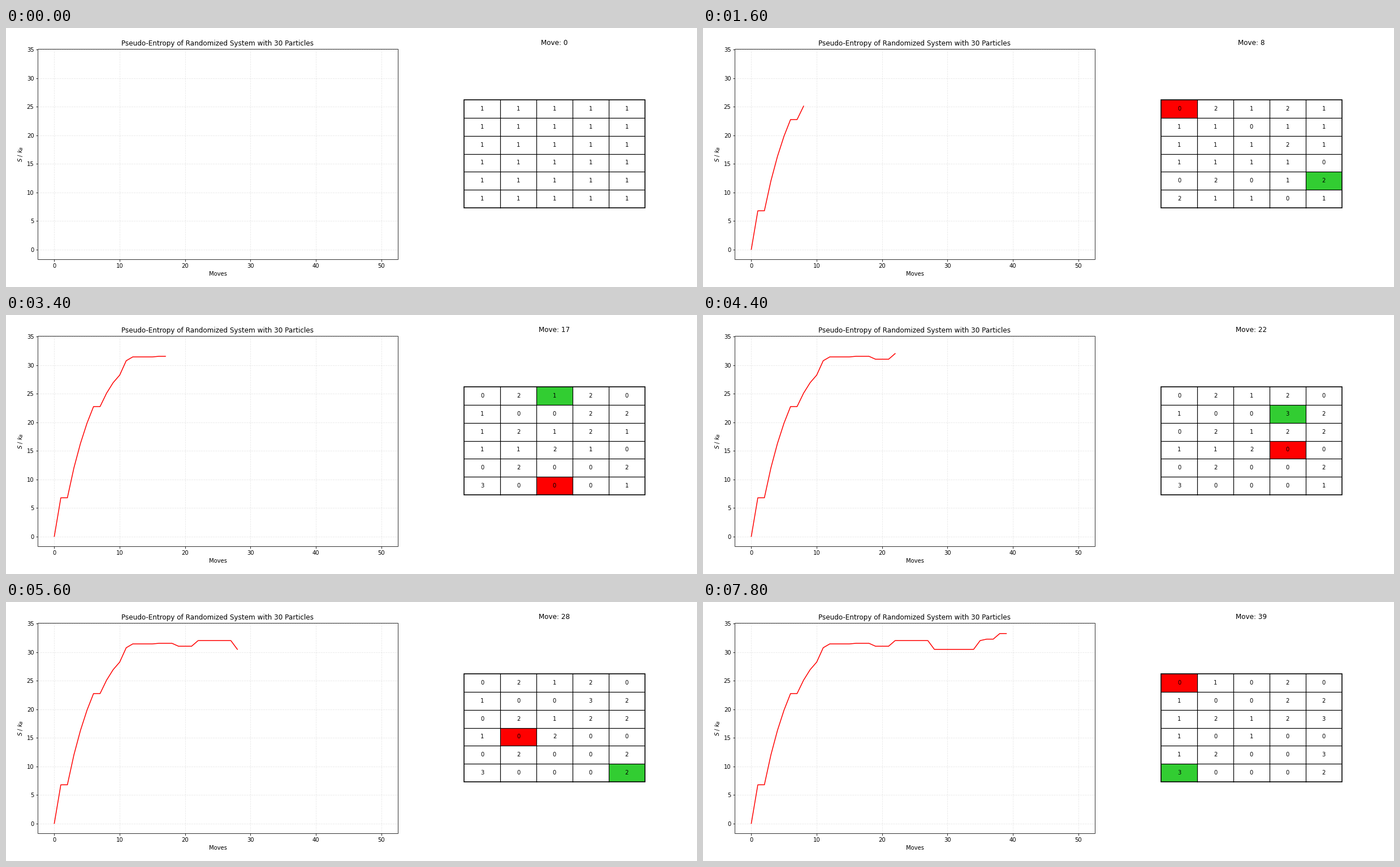
Write a matplotlib script that moves like this. It is 1222 px wide and 458 px high and loops after 8000 ms.

```python
import math
import random
from collections import Counter

import matplotlib.pyplot as plt
from matplotlib.animation import FuncAnimation
from matplotlib.patches import Rectangle

W, H, DPI = 1222, 458, 72
ROWS, COLS = 6, 5
STEPS = 40
MAX_S = 33.498

# Moves that shift a particle: step -> (from row, col), (to row, col).
# In every other step an empty cell is picked and nothing happens.
MOVES = {
    1: ((1, 2), (2, 1)), 2: ((2, 1), (0, 1)), 3: ((3, 4), (2, 3)),
    4: ((5, 3), (4, 1)), 5: ((4, 2), (0, 3)), 6: ((4, 0), (5, 0)),
    8: ((0, 0), (4, 4)), 9: ((0, 2), (2, 1)), 10: ((5, 1), (3, 2)),
    11: ((0, 4), (5, 0)), 12: ((4, 3), (5, 2)), 13: ((5, 2), (1, 3)),
    16: ((1, 1), (1, 4)), 17: ((5, 2), (0, 2)), 19: ((2, 0), (2, 4)),
    22: ((3, 3), (1, 3)), 28: ((3, 1), (5, 4)), 30: ((1, 3), (4, 4)),
    33: ((3, 3), (0, 0)), 35: ((0, 1), (2, 0)), 36: ((0, 2), (2, 4)),
    38: ((3, 2), (4, 0)), 39: ((0, 0), (5, 0)),
}


def entropy(grid):
    """Log of the number of ways to arrange the occupation numbers."""
    groups = Counter(grid.values()).values()
    return math.lgamma(len(grid) + 1) - sum(math.lgamma(n + 1) for n in groups)


def simulate():
    rng = random.Random(4)
    cells = [(r, c) for r in range(ROWS) for c in range(COLS)]
    grid = dict.fromkeys(cells, 1)
    history = [(dict(grid), None, None)]
    for step in range(1, STEPS):
        if step in MOVES:
            src, dst = MOVES[step]
        else:
            src = rng.choice([p for p in cells if grid[p] == 0])
            dst = rng.choice([p for p in cells if p != src])
        if grid[src]:
            grid[src] -= 1
            grid[dst] += 1
        history.append((dict(grid), src, dst))
    return history


def pixel_axes(left, top, right, bottom):
    return fig.add_axes([left / W, 1 - bottom / H,
                         (right - left) / W, (bottom - top) / H])


history = simulate()
curve = [entropy(grid) for grid, _, _ in history]

plt.rcParams["font.family"] = "DejaVu Sans"
fig = plt.figure(figsize=(W / DPI, H / DPI), dpi=DPI, facecolor="white")

chart = pixel_axes(56.5, 36.5, 692.5, 408.5)
chart.set_xlim(-2.5, 52.5)
chart.set_ylim(-0.05 * MAX_S, 1.05 * MAX_S)
chart.grid(linestyle="--", alpha=0.3)
chart.set_title("Pseudo-Entropy of Randomized System with 30 Particles")
chart.set_xlabel("Moves")
chart.set_ylabel("$S$ / $k_B$")
line, = chart.plot([], [], color="red", lw=1.5)

board = pixel_axes(810.3, 36.5, 1129.6, 408.5)
board.axis("off")
board.set_xlim(0, COLS)
half = 372 / 2 / 31.9
board.set_ylim(ROWS / 2 + half, ROWS / 2 - half)
title = board.set_title("")

patches, labels = {}, {}
for r, c in history[0][0]:
    patches[r, c] = board.add_patch(Rectangle((c, r), 1, 1, lw=0))
    labels[r, c] = board.text(c + 0.5, r + 0.5, "", size=10,
                              ha="center", va="center")
for c in range(1, COLS):
    board.plot([c, c], [0, ROWS], color="black", lw=1.2)
for r in range(1, ROWS):
    board.plot([0, COLS], [r, r], color="black", lw=1.2)
board.add_patch(Rectangle((0, 0), COLS, ROWS, fill=False, lw=1.6,
                          edgecolor="black", zorder=3, clip_on=False))


def update(step):
    grid, src, dst = history[step]
    line.set_data(range(step + 1), curve[:step + 1])
    title.set_text(f"Move: {step}")
    for cell, count in grid.items():
        color = {src: "red", dst: "limegreen"}.get(cell, "white")
        patches[cell].set_facecolor(color)
        labels[cell].set_text(str(count))
    return [line, title, *patches.values(), *labels.values()]


anim = FuncAnimation(fig, update, frames=STEPS, interval=200,
                     repeat=True, repeat_delay=0, blit=False)
plt.show()
```
